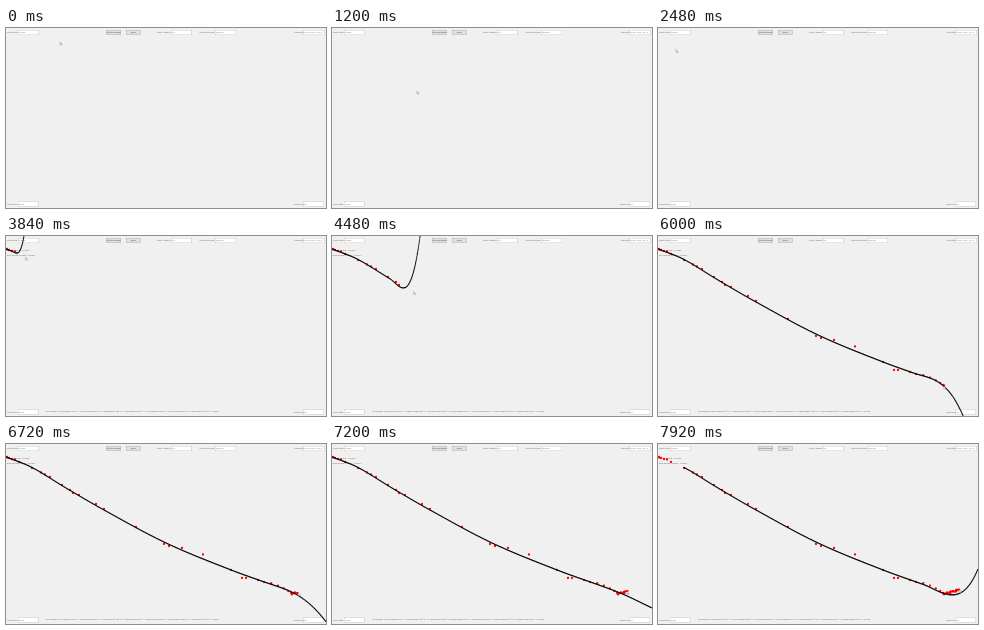
An HTML page with a canvas that plays this animation: 320x180 px, repeating every 8 s.

```html
<!DOCTYPE html>
<html lang="en">
<head>
<meta charset="utf-8">
<title>Curve fitting</title>
<style>
html, body { margin: 0; height: 100%; overflow: hidden; background: #f0f0f0; }
canvas { display: block; width: 100vw; height: 100vh; }
</style>
</head>
<body>
<canvas id="stage" width="320" height="180"></canvas>
<script>
const ctx = document.getElementById('stage').getContext('2d');
const LOOP = 8000, STEP = 80, START = 3840;

const pairs = s => s.trim().split(/\s+/).map(p => p.split(',').map(Number));

// Samples in the order they are placed: a sparse sweep, a bend, then a scribble
const samples = pairs(`1,13 3,14 6,15 9,15.5 13,18 26,24 35,28.5 39,30.5 44,33 56,41 64,46
  67,49 73,51 90,60 98,65 130,83 158,100 163,102 176,104 197,110.5 225,126 236,134 240,134 252,136`);
for (let k = 0; k < 7; k++) {
  const u = Math.sin(k / 6 * Math.PI / 2);
  samples.push([258 + 28 * u, 138 + 11.5 * u ** 1.7]);
}
for (let k = 0; k < 24; k++)
  samples.push([286 + k * 0.62 + Math.sin(k * 5), 149.8 - k * 0.16 + Math.cos(k * 7) * 0.6]);

// Pointer before the first sample: time, x, y
const wander = [[0, 54, 14], [160, 61, 20], [1120, 86, 66], [2000, 74, 33], [2160, 74, 33],
  [2480, 18, 21.5], [3840, 2, 13]];

// Shared trend of all fits, and the tail that swings away from it
const trend = pairs('0,13 26,23.5 60,44 98,66 160,99 225,126 288,149 320,164');
// time, tip x, tail length, offset from the trend at the tip
const tails = [[START, 16, 10, -10], [4480, 88, 30, -60], [5280, 265, 85, 39],
  [6000, 305, 50, 23], [7200, 320, 60, 0], [7920, 320, 55, -39]];

const mix = (a, b, k) => a.map((v, i) => v + (b[i] - v) * k);

function at(keys, t) {
  const i = Math.max(1, keys.findIndex(key => key[0] >= t));
  const a = keys[i - 1], b = keys[i];
  return mix(a, b, (t - a[0]) / (b[0] - a[0])).slice(1);
}

function trendAt(x) {
  const last = trend.length - 1;
  const i = Math.max(0, trend.findIndex(k => k[0] >= x) - 1);
  const slope = j => {
    const a = trend[Math.max(j - 1, 0)], b = trend[Math.min(j + 1, last)];
    return (b[1] - a[1]) / (b[0] - a[0]);
  };
  const [x0, y0] = trend[i], [x1, y1] = trend[i + 1];
  const w = x1 - x0, u = (x - x0) / w, v = 1 - u;
  return v * v * (1 + 2 * u) * y0 + u * u * (3 - 2 * u) * y1
    + w * u * v * (v * slope(i) - u * slope(i + 1));
}

function fillDots(points, r, color) {
  ctx.beginPath();
  for (const [x, y] of points) {
    ctx.moveTo(x + r, y);
    ctx.arc(x, y, r, 0, 7);
  }
  ctx.fillStyle = color;
  ctx.fill();
}

function drawCurve(t) {
  const [tip, length, offset] = at(tails, t);
  const points = [];
  for (let x = t < 7760 ? 0 : 26; x <= 320; x += 1 / 6) {
    const s = Math.max(0, (x - tip) / length + 1);
    const y = trendAt(x) + 2 * offset * s * s * (s - 0.5);
    if (y > -2 && y < 182) points.push([x, y]);
  }
  fillDots(points, 0.58, '#111');
}

function text(s, x, y, color = '#666', size = 2.2) {
  ctx.font = size + 'px "Liberation Sans", Arial, sans-serif';
  ctx.fillStyle = color;
  ctx.fillText(s, x, y);
}

function box(x, y, w, h, fill, edge) {
  ctx.fillStyle = edge;
  ctx.fillRect(x, y, w, h);
  ctx.fillStyle = fill;
  ctx.fillRect(x + 0.35, y + 0.35, w - 0.7, h - 0.7);
}

function field(label, lx, x, y, w, value) {
  text(label, lx, y + 3.2);
  box(x, y, w, 5, '#fff', '#bbb');
  text(value, x + 0.8, y + 3.2);
}

function button(label, x, w) {
  box(x, 2, w, 4.6, '#e1e1e1', '#a4a4a4');
  ctx.textAlign = 'center';
  text(label, x + w / 2, 5.1, '#444', 2);
  ctx.textAlign = 'left';
}

function drawForm() {
  field('Input MSE:', 1, 12, 2, 20.5, '0.0001');
  button('Plot Best Model', 100, 15);
  button('Reset', 120, 14.5);
  field('Input Address:', 151, 165, 2, 20.5, '1.0');
  field('Add Model Row:', 193, 209, 2, 21, '1000.00');
  field('Add Data:', 288, 297.5, 2, 21, '(0.00, 0.00), 1.0, 0');
  field('Input Rate:', 1, 12, 173.3, 20.5, '0.001');
  field('Input FPS:', 288, 297.5, 173.3, 20.5, '60');
}

function drawReadout(t) {
  ctx.fillStyle = '#e33';
  ctx.fillRect(0.5, 13, 1.6, 1.6);
  text('Input RMSE: 1.24332', 2.5, 14.9);
  text('Best RMSE (model): 1.20817', 1, 20);
  const terms = [];
  for (let p = 7; p > 0; p--) {
    const c = 1 + Math.abs(Math.sin(t / STEP + p * 3)) * 8;
    terms.push(`${c.toFixed(8)}E-0${p}x^${p}`);
  }
  text('Polynomial: ' + terms.join(' + ') + ' + 0.0001', 40, 176.3);
}

function drawPointer([x, y]) {
  ctx.beginPath();
  [[0, 0], [0, 2.9], [0.8, 2.3], [1.3, 3.3], [1.8, 3], [1.3, 2.1], [2.2, 2.1]]
    .forEach(([dx, dy]) => ctx.lineTo(x + dx, y + dy));
  ctx.closePath();
  ctx.fillStyle = '#fff';
  ctx.fill();
  ctx.strokeStyle = '#777';
  ctx.lineWidth = 0.4;
  ctx.stroke();
}

function draw(now) {
  const t = Math.floor(now % LOOP / STEP) * STEP;
  ctx.fillStyle = '#f0f0f0';
  ctx.fillRect(0, 0, 320, 180);
  drawForm();
  if (t < START) {
    drawPointer(at(wander, t));
    return;
  }
  // One sample per step; the pointer runs just ahead
  const n = 4 + (t - START) / STEP, end = samples.length - 1;
  drawReadout(t);
  fillDots(samples.slice(0, n), 1.15, '#f00');
  drawCurve(t);
  drawPointer(mix(samples[Math.min(n, end)], samples[Math.min(n + 1, end)], 0.5));
}

const begin = performance.now();
function frame() {
  draw(performance.now() - begin);
  requestAnimationFrame(frame);
}
frame();
</script>
</body>
</html>
```
